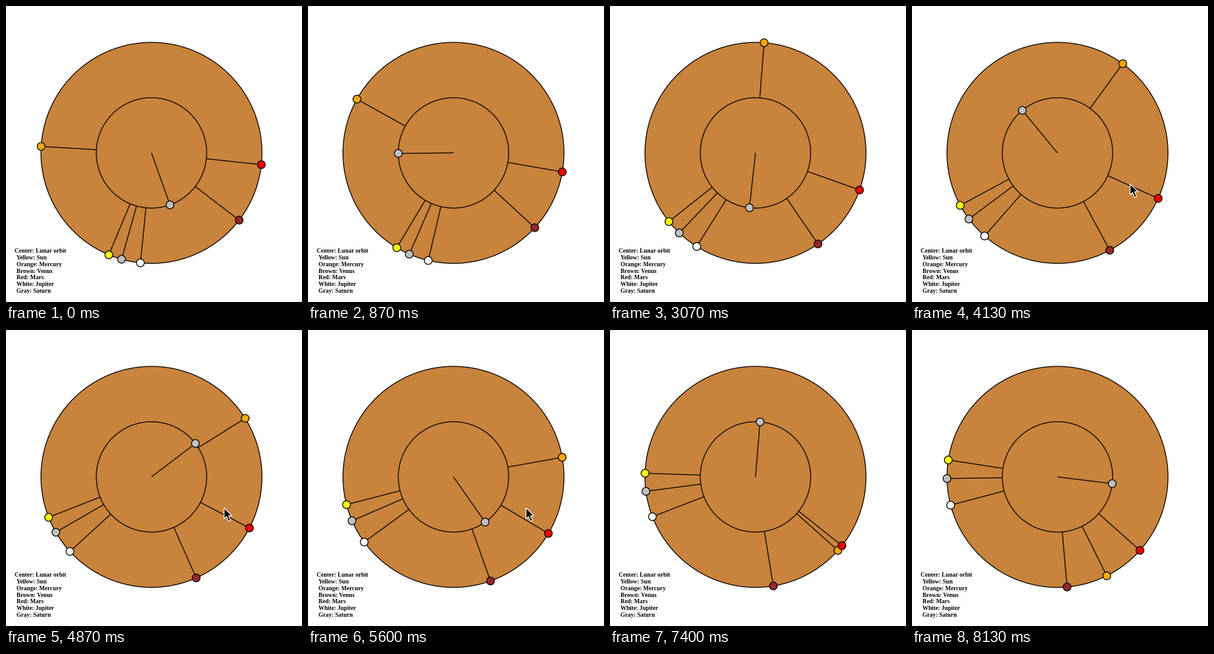
Write a matplotlib script that moves like this. It is 480 by 480 pixels and loops after 8190 ms.

```python
import numpy as np
import matplotlib.pyplot as plt
from matplotlib.animation import FuncAnimation
from matplotlib.patches import Circle, Polygon

SIZE, DPI = 480, 100
FRAMES, LOOP_MS = 123, 8190
PX = 72 / DPI  # points per pixel
CX, CY = 235.9, 238.2
R_OUT, R_IN, R_DOT = 179.2, 89.5, 6.3
LINE = 1.35 * PX

# start angle and degrees per step, clockwise from the right
BODIES = [
    # color, start, rate, spoke start, spoke end
    ("#f5a80c", 183.35, 1.9815, R_IN, R_OUT),   # Mercury
    ("#98262a", 37.5, 0.392, R_IN, R_OUT),      # Venus
    ("#f00000", 6.1, 0.2938, R_IN, R_OUT),      # Mars
    ("#ffffff", 95.74, 0.573, R_IN, R_OUT),     # Jupiter
    ("#c0c0c0", 105.7, 0.606, R_IN, R_OUT),     # Saturn
    ("#ffff00", 112.7, 0.628, R_IN, R_OUT),     # Sun
    ("#c0c0c0", 70.4, 8.388, 0, R_IN),          # Moon
]

LEGEND = ["Center: Lunar orbit", "Yellow: Sun", "Orange: Mercury",
          "Brown: Venus", "Red: Mars", "White: Jupiter", "Gray: Saturn"]

ARROW = np.array([(0, 0), (0, 17.6), (4, 13.9), (7.3, 21.6),
                  (10.6, 20.2), (7.3, 12.6), (12.8, 12.4)])

fig = plt.figure(figsize=(SIZE / DPI, SIZE / DPI), dpi=DPI, facecolor="white")
ax = fig.add_axes([0, 0, 1, 1])
ax.set_xlim(0, SIZE)
ax.set_ylim(SIZE, 0)
ax.axis("off")


def disc(xy, radius, color, z):
    return ax.add_patch(Circle(xy, radius, fc=color, ec="black", lw=LINE, zorder=z))


def polar(radius, degrees):
    a = np.radians(degrees)
    return CX + radius * np.cos(a), CY + radius * np.sin(a)


disc((CX, CY), R_OUT, "#c8833c", 1)
disc((CX, CY), R_IN, "#c8833c", 2)

for row, label in enumerate(LEGEND):
    ax.text(14.5 if row == 0 else 16.9, 400.3 + 10.75 * row, label,
            family="Liberation Serif", weight="bold", size=9.6 * PX,
            va="baseline", ha="left")

spokes = [ax.plot([], [], color="black", lw=LINE, zorder=3,
                  solid_capstyle="butt")[0] for _ in BODIES]
dots = [disc((0, 0), R_DOT, body[0], 4) for body in BODIES]
cursor = ax.add_patch(Polygon(ARROW, fc="black", ec="white", lw=1.3 * PX, zorder=5))


def draw(i):
    step = i if i <= 102 else i - 0.8  # the orbits hesitate once
    for (_, start, rate, r0, r1), spoke, dot in zip(BODIES, spokes, dots):
        angle = start + rate * step
        x0, y0 = polar(r0, angle)
        x1, y1 = polar(r1, angle)
        spoke.set_data([x0, x1], [y0, y1])
        dot.center = x1, y1
    cursor.set_visible(54 <= i < 103)
    cursor.set_xy(ARROW + (353.6, np.interp(i, [89, 94], [288.6, 320.2])))
    return [*spokes, *dots, cursor]


anim = FuncAnimation(fig, draw, frames=FRAMES, interval=LOOP_MS / FRAMES,
                     repeat=True, repeat_delay=0, blit=False)
plt.show()
```
